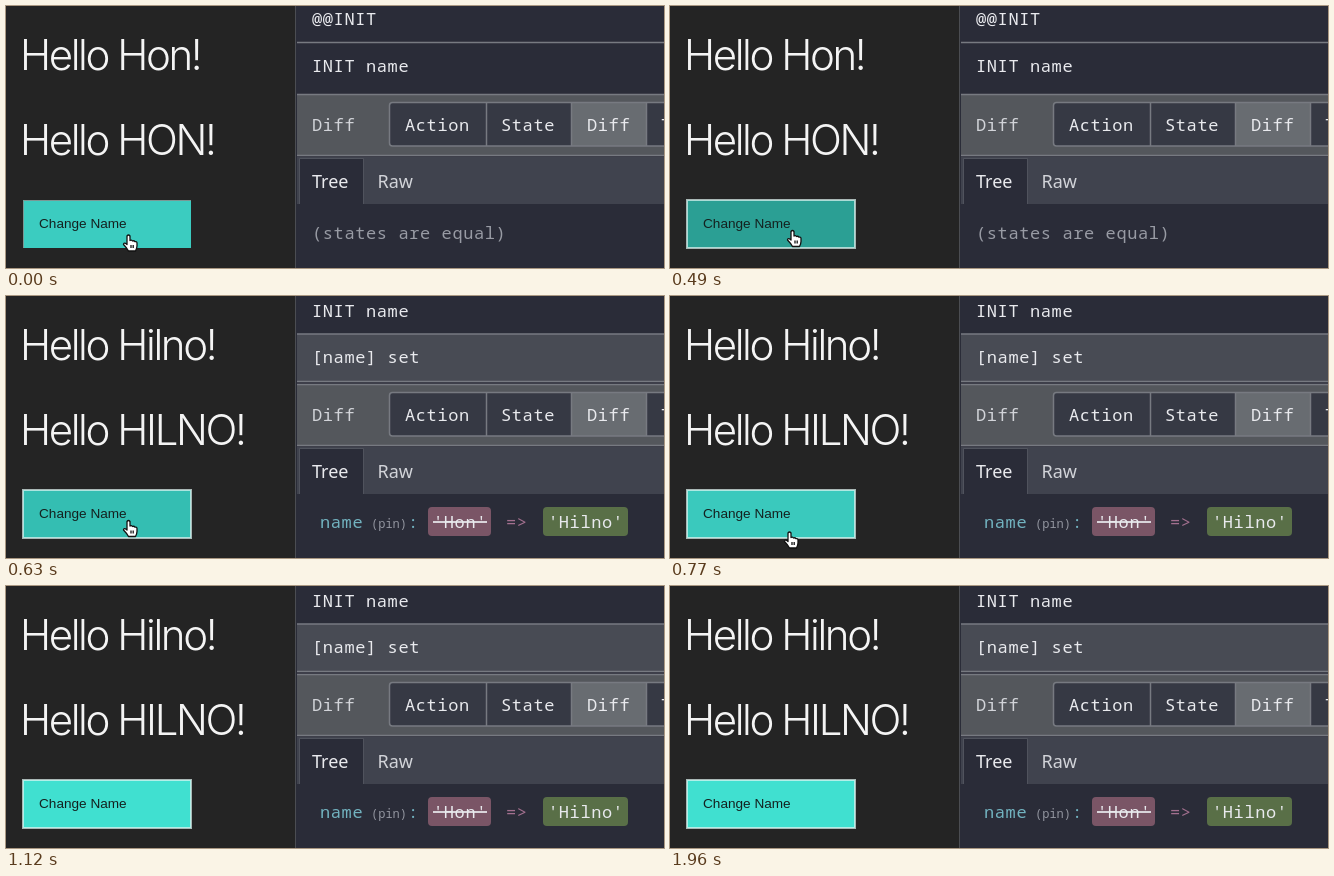
An HTML page for the animation above (3010 ms loop, 658 px wide and 262 px high).

```html
<!DOCTYPE html>
<html lang="en">
<head>
<meta charset="utf-8">
<title>Change Name</title>
<style>
  html, body { margin: 0; width: 100%; height: 100%; overflow: hidden; background: #242424; }
  svg { display: block; }
  text { white-space: pre; }
  .title { font: 300 42px Inter, sans-serif; font-optical-sizing: none; letter-spacing: -2.4px; fill: #f4f4f4; }
  .label { font: 13.6px "Liberation Sans", Arial, sans-serif; fill: #14211f; }
  .mono { font: 17px "Noto Sans Mono", monospace; letter-spacing: .6px; fill: #e9eaee; }
  .mono .tab { font: 18px "Noto Sans", sans-serif; letter-spacing: 0; }
  .mono .dim { fill: #d2d4d9; }
  .mono .faint { fill: #989ba4; }
  .mono .small { font-size: 12px; letter-spacing: 0; fill: #92959f; }
  .line { fill: none; stroke: #777a81; stroke-width: 1.5; }
</style>
</head>
<body>
<svg width="658" height="262" viewBox="0 0 658 262">
  <rect width="658" height="262" fill="#242424"/>
  <g class="title">
    <text id="greeting" x="14" y="64"></text>
    <text id="shout" x="14" y="149"></text>
  </g>

  <rect id="button" x="17" y="194" width="168" height="48"/>
  <path id="bevel" d="M17.5 242V194.5H185" fill="none" stroke="#7b9794"/>
  <rect id="focus" x="17" y="194" width="168" height="48" fill="none" stroke="#e2f5f3" stroke-opacity=".7" stroke-width="2"/>
  <text class="label" x="33" y="222">Change Name</text>

  <rect x="289" width="1" height="262" fill="#4b4d52"/>
  <rect x="290" width="368" height="262" fill="#2a2c38"/>
  <g class="mono">
    <g id="before">
      <path class="line" d="M291 36.5H658"/>
      <text x="306" y="19">@@INIT</text>
      <text x="306" y="66">INIT name</text>
      <text class="faint" x="306" y="233">(states are equal)</text>
    </g>
    <g id="after">
      <rect x="291" y="38" width="367" height="48" fill="#484b54"/>
      <path class="line" d="M291 38H658M291 85.5H658"/>
      <text x="306" y="21">INIT name</text>
      <text x="306" y="67">[name] set</text>
      <text x="314" y="232" style="fill:#72b3c0">name</text>
      <text class="small" x="365" y="232">(pin)</text>
      <text x="402" y="232" style="fill:#72b3c0">:</text>
      <rect x="422" y="211" width="63" height="29" rx="4" fill="#7a5566"/>
      <text id="oldName" x="427" y="232" text-decoration="line-through"></text>
      <text x="500" y="232" style="fill:#a3708f">=&gt;</text>
      <rect x="537" y="211" width="85" height="29" rx="4" fill="#596f47"/>
      <text id="newName" x="542" y="232"></text>
    </g>

    <rect x="291" y="88" width="367" height="62" fill="#54575c"/>
    <path class="line" d="M291 88.5H658M291 149.5H658"/>
    <text class="dim" x="306" y="125">Diff</text>
    <rect x="383.5" y="96.5" width="290" height="43.5" rx="3" fill="#363944"/>
    <rect x="565" y="97" width="75" height="43" fill="#686c71"/>
    <path class="line" d="M480.5 97V140M565.5 97V140M640.5 97V140"/>
    <rect class="line" x="383.5" y="96.5" width="290" height="43.5" rx="3"/>
    <text x="399" y="125">Action</text>
    <text x="495" y="125">State</text>
    <text x="581" y="125">Diff</text>
    <text x="655" y="125">Test</text>

    <rect x="291" y="151" width="367" height="47" fill="#40434e"/>
    <rect x="293" y="153" width="64" height="45" fill="#2a2c38"/>
    <path d="M293.5 198V152.5H357.5V198" fill="none" stroke="#50535d"/>
    <text class="tab" x="306" y="182">Tree</text>
    <text class="tab dim" x="371.5" y="182">Raw</text>
  </g>

  <path id="hand" fill="#fff" stroke="#111" stroke-width="1.3" stroke-linejoin="round"
    d="M0 1q1.5-2 3 0v4.5q1.5-1 2.5.5q1.5-.8 2.4.6q2-.4 2.1 1.4v3q0 2-1.5 5h-7q-1.5-3-5-6.5q0-2 2-1.2l1.5 1.2zM4 10v3M6.2 10v3"/>
</svg>
<script>
  const LOOP = 3010, STEP = 70, PRESS = 490, UPDATE = 560;
  const NAMES = ["Hon", "Hilno"];

  // Each key is [time, ...values].
  const buttonKeys = [[0, 59, 204, 192], [210, 56, 200, 187], [420, 56, 200, 187], [490, 43, 159, 148],
    [560, 48, 179, 168], [700, 56, 200, 187], [770, 58, 201, 189], [980, 64, 224, 208]];
  const handKeys = [[0, 121, 229], [140, 121, 224.5], [630, 121, 224.5], [770, 118, 236],
    [910, 115, 262], [980, 114, 280]];

  const byId = id => document.getElementById(id);
  const show = (id, on) => byId(id).setAttribute("visibility", on ? "visible" : "hidden");

  function valueAt(keys, t) {
    const next = keys.findIndex(key => key[0] > t);
    if (next < 0) return keys[keys.length - 1].slice(1);
    const a = keys[next - 1], b = keys[next];
    const k = (t - a[0]) / (b[0] - a[0]);
    return a.slice(1).map((v, i) => v + (b[i + 1] - v) * k);
  }

  function draw(now) {
    const t = Math.floor(now % LOOP / STEP) * STEP;
    const updated = t >= UPDATE, focused = t >= PRESS;
    const name = NAMES[+updated];
    byId("greeting").textContent = `Hello ${name}!`;
    byId("shout").textContent = `Hello ${name.toUpperCase()}!`;
    show("before", !updated);
    show("after", updated);
    show("focus", focused);
    show("bevel", !focused);
    byId("button").setAttribute("fill", `rgb(${valueAt(buttonKeys, t).map(Math.round)})`);
    byId("hand").setAttribute("transform", `translate(${valueAt(handKeys, t)})`);
  }

  byId("oldName").textContent = `'${NAMES[0]}'`;
  byId("newName").textContent = `'${NAMES[1]}'`;

  const start = performance.now();
  function tick() {
    draw(performance.now() - start);
    requestAnimationFrame(tick);
  }
  tick();
</script>
</body>
</html>
```
